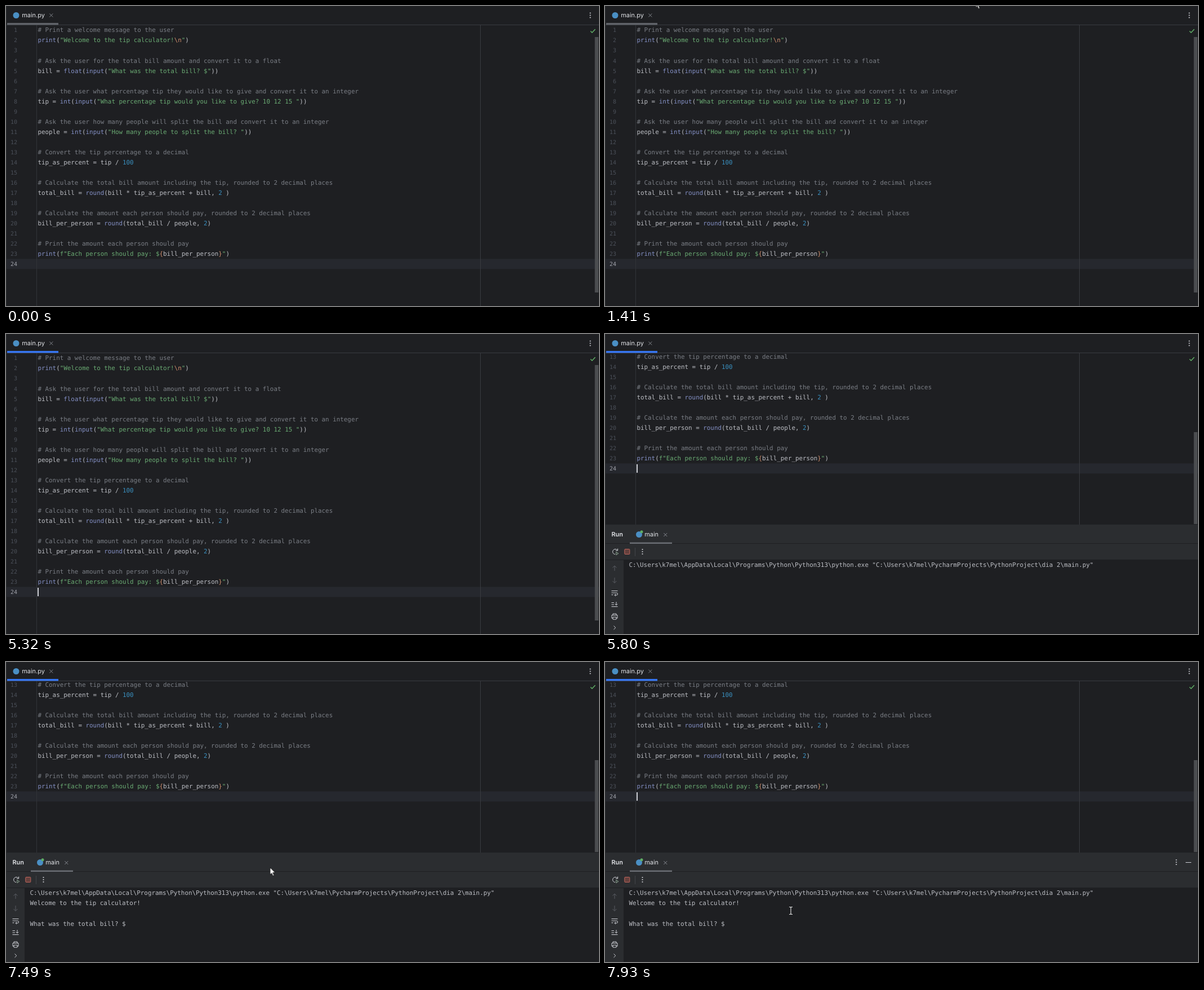
These frames come from a looping animation (1053 by 532 pixels, 8 s). An HTML page:

```html
<!DOCTYPE html>
<html lang="en">
<head>
<meta charset="utf-8">
<title>Tip calculator</title>
<style>
  html, body { margin: 0; width: 100%; height: 100%; overflow: hidden; background: #1e1f22; }
  svg { display: block; width: 100vw; height: 100vh; }
  text { white-space: pre; text-rendering: geometricPrecision; }
  .mono text { font: 10.88px "DejaVu Sans Mono", monospace; fill: #bcbec4; }
  .mono .num { font-size: 10.05px; fill: #4b5059; text-anchor: end; }
  .mono .now { fill: #a1a3ab; }
  .ui { font: 10.92px Inter, sans-serif; fill: #dfe1e5; }
  .title { font-weight: 600; }
  .hint { fill: #868a91; }
  .comment { fill: #7a7e85; }
  .string { fill: #6aab73; }
  .builtin { fill: #8490c5; }
  .number { fill: #3a90c0; }
  .escape { fill: #cf8e6d; }
  .plain { fill: #bcbec4; }
  .icon { fill: none; stroke: #ced0d6; stroke-width: 1; }
  .dim { stroke: #5a5d63; }
  .close { stroke: #868a91; }
  .play { stroke: #8fa894; }
  .dots { fill: #ced0d6; }
  .thumb { fill: #4b4d50; }
</style>
</head>
<body>
<svg viewBox="0 0 1053 532">
  <defs>
    <clipPath id="pane"><rect y="34" width="1053" height="498"/></clipPath>
    <g id="dots" class="dots">
      <circle cy="-4" r="1.1"/><circle r="1.1"/><circle cy="4" r="1.1"/>
    </g>
    <path id="close" class="icon close" d="M-3 -3L3 3M3 -3L-3 3"/>
  </defs>
  <rect width="1053" height="532" fill="#1e1f22"/>

  <!-- editor -->
  <g clip-path="url(#pane)">
    <g id="code" class="mono">
      <rect x="1" y="448.4" width="1052" height="18" fill="#26282e"/>
    </g>
    <path d="M54.5 34V532" stroke="#313438"/>
    <path d="M842.5 34V532" stroke="#393b40"/>
    <g id="caret"><rect x="56" y="450" width="2" height="15" fill="#ced0d6"/></g>
  </g>
  <rect id="thumbTall" class="thumb" x="1045.6" y="55" width="6.4" height="453"/>
  <rect id="thumbShort" class="thumb" x="1045.6" y="174" width="6.4" height="163"/>
  <path d="M1038 44.5L1040.7 47.2L1046.3 41.2" fill="none" stroke="#5fad65" stroke-width="1.6"/>

  <!-- tab bar -->
  <path d="M0 33.5H1053" stroke="#393b40"/>
  <circle cx="18" cy="16.5" r="5.5" fill="#4a8fc4"/>
  <text class="ui" x="28.3" y="20.3">main.py</text>
  <use href="#close" x="80.3" y="16.5"/>
  <use href="#dots" x="1037.5" y="16.5"/>
  <rect x="2" y="30" width="91" height="3.5" fill="#5f6268"/>
  <rect id="focus" x="2" y="30" width="91" height="3.5" fill="#3574f0"/>

  <g id="tip">
    <rect x="666.5" y="-12.5" width="141" height="28" rx="3" fill="#393b40" stroke="#43454a"/>
    <text class="ui" x="675" y="6">Run 'main.py'</text>
    <text class="ui hint" x="749" y="6">Shift+F10</text>
  </g>

  <!-- run panel -->
  <g id="run">
    <rect y="338" width="1053" height="194" fill="#2b2d30"/>
    <rect x="33" y="401" width="1020" height="131" fill="#1e1f22"/>
    <path d="M0 371.5H1053M0 400.5H1053" stroke="#1e1f22"/>
    <text class="ui title" x="11.5" y="359">Run</text>
    <circle cx="60.5" cy="355.5" r="5.5" fill="#4a8fc4"/>
    <circle cx="65" cy="350.8" r="2.5" fill="#5fad65"/>
    <text class="ui" x="70.3" y="359">main</text>
    <use href="#close" x="107.3" y="356"/>
    <rect x="44" y="369.5" width="75" height="2.5" fill="#6a6d73"/>

    <path class="icon" d="M22 383.5A4.6 4.6 0 1 0 18 390.7M22.6 380.5V384H19"/>
    <path class="icon play" d="M19.8 386.6L23.8 389.2L19.8 391.8Z"/>
    <rect x="34.8" y="381.5" width="9" height="9" rx="1" fill="#64403d" stroke="#c0655c"/>
    <path d="M53.5 379V394" stroke="#43454a"/>
    <use href="#dots" x="66.5" y="386"/>

    <path class="icon dim" d="M17 420V411M13.5 414.5L17 411L20.5 414.5"/>
    <path class="icon dim" d="M17 432V441.5M13.5 438L17 441.5L20.5 438"/>
    <path class="icon" d="M11.5 455.5H22.5M11.5 459H20.5A2 2 0 0 1 20.5 463H17M19 461L17 463L19 465M11.5 462.5H14.5"/>
    <path class="icon" d="M11.5 476.5H16M11.5 480H16M11.5 483.5H22.5M20 475V481M17.7 478.8L20 481L22.3 478.8"/>
    <path class="icon" d="M14 498.5V496H20V498.5M14 504H12V498.5H22V504H20M14 502H20V506H14Z"/>
    <path class="icon" d="M15.5 517.5L18.8 520.8L15.5 524"/>

    <g class="mono">
      <text x="42.4" y="413.4">C:\Users\k7mel\AppData\Local\Programs\Python\Python313\python.exe "C:\Users\k7mel\PycharmProjects\PythonProject\dia 2\main.py"</text>
      <g id="output">
        <text x="42.4" y="431.4">Welcome to the tip calculator!</text>
        <text x="42.4" y="467.5">What was the total bill? $</text>
      </g>
    </g>
    <g id="tools">
      <use href="#dots" x="1014.5" y="355"/>
      <path class="icon" d="M1031 355.5H1041"/>
    </g>
  </g>
  <path d="M.5 0V532" stroke="#2b2d30"/>

  <g id="beam" fill="none">
    <path d="M-3 -6.5H-1L0 -5.5L1 -6.5H3M0 -5.5V5.5M-3 6.5H-1L0 5.5L1 6.5H3" stroke="#e8e8e8" stroke-width="1.1"/>
  </g>
  <g id="arrow">
    <path d="M.5 .5V13L3.3 10.4L5.4 15.3L7.5 14.4L5.4 9.6H9.3Z" fill="#fff" stroke="#111" stroke-width=".8"/>
  </g>
</svg>
<script>
const LOOP = 8000, PITCH = 18.04, SCROLL = 219;
const $ = id => document.getElementById(id);

const source = String.raw`# Print a welcome message to the user
print("Welcome to the tip calculator!\n")

# Ask the user for the total bill amount and convert it to a float
bill = float(input("What was the total bill? $"))

# Ask the user what percentage tip they would like to give and convert it to an integer
tip = int(input("What percentage tip would you like to give? 10 12 15 "))

# Ask the user how many people will split the bill and convert it to an integer
people = int(input("How many people to split the bill? "))

# Convert the tip percentage to a decimal
tip_as_percent = tip / 100

# Calculate the total bill amount including the tip, rounded to 2 decimal places
total_bill = round(bill * tip_as_percent + bill, 2 )

# Calculate the amount each person should pay, rounded to 2 decimal places
bill_per_person = round(total_bill / people, 2)

# Print the amount each person should pay
print(f"Each person should pay: $` + String.raw`{bill_per_person}")
`;

// Syntax colouring
function add(parent, tag, cls, str, attrs = {}) {
  const el = document.createElementNS('http://www.w3.org/2000/svg', tag);
  if (cls) el.setAttribute('class', cls);
  for (const k in attrs) el.setAttribute(k, attrs[k]);
  el.textContent = str;
  parent.append(el);
  return el;
}
const tokens = /(^#.*|f?"[^"]*"|\b(?:print|float|input|int|round)\b|\b\d+\b)/;
function kind(s) {
  if (s[0] === '#') return 'comment';
  if (s.includes('"')) return 'string';
  if (/^\d/.test(s)) return 'number';
  return tokens.test(s) ? 'builtin' : 'plain';
}
function inString(s) {
  if (/^(\\n|[{}])$/.test(s)) return 'escape';
  return s === 'bill_per_person' ? 'plain' : 'string';
}
source.split('\n').forEach((line, i, all) => {
  const y = 46.4 + i * PITCH;
  add($('code'), 'text', i === all.length - 1 ? 'num now' : 'num', i + 1, { x: 20, y });
  const row = add($('code'), 'text', '', '', { x: 56.4, y });
  for (const part of line.split(tokens).filter(Boolean)) {
    const cls = kind(part);
    if (cls !== 'string') add(row, 'tspan', cls, part);
    else for (const bit of part.split(/(\\n|[{}]|bill_per_person)/).filter(Boolean))
      add(row, 'tspan', inString(bit), bit);
  }
});

// Hard steps: rows of [time, properties]
function steps(el, rows) {
  const frames = rows.map(([t, props]) => ({ ...props, offset: t / LOOP, easing: 'step-end' }));
  frames.push({ ...rows.at(-1)[1], offset: 1 });
  el.animate(frames, { duration: LOOP, iterations: Infinity });
}
// Starts hidden unless on is true, then flips at each time
function toggle(id, times, on = false) {
  steps($(id), [0, ...times].map((t, i) => [t, { opacity: +(i % 2 ? !on : on) }]));
}
const shift = id => steps($(id), [0, -SCROLL].map((y, i) =>
  [i * 5800, { transform: `translate(0px, ${y}px)` }]));

shift('code');
shift('caret');
toggle('caret', [5320, 6140, 6630, 7180, 7690]);
toggle('focus', [5320]);
toggle('tip', [2370, 5320]);
toggle('run', [5800]);
toggle('thumbTall', [5800], true);
toggle('thumbShort', [5800]);
toggle('output', [6570]);
toggle('tools', [7560]);

// Pointer: [time, x, y]
const path = [
  [670, 1018, 476], [760, 930, 290], [850, 810, 120], [940, 746, 47],
  [1040, 708, 24], [1200, 668, 6], [1440, 655, -15],
  [7060, 663, 2], [7180, 560, 331], [7490, 468.5, 364], [7700, 385, 408], [7930, 330, 441]
];
function at(t) {
  const i = Math.max(1, path.findIndex(p => p[0] >= t));
  const [a, b] = [path[i - 1], path[i]];
  const k = (t - a[0]) / (b[0] - a[0]);
  return [1, 2].map(j => a[j] + (b[j] - a[j]) * k);
}
const ticks = (from, to, n) => Array.from({ length: n + 1 }, (_, i) => from + (to - from) * i / n);
const overText = y => (y >= 34 && y < 338) || y >= 401;

const times = [
  ...ticks(670, 940, 6), ...ticks(980, 1440, 9),
  ...ticks(7060, 7180, 3), 7490, ...ticks(7560, 7930, 9)
];
for (const id of ['beam', 'arrow']) {
  const rows = times.map(t => {
    const [x, y] = at(t);
    const shown = overText(y) === (id === 'beam');
    return [t, { transform: `translate(${x}px, ${y}px)`, opacity: +shown }];
  });
  const hidden = { transform: 'translate(0px, 0px)', opacity: 0 };
  rows.push([0, hidden], [1500, hidden]);
  steps($(id), rows.sort((a, b) => a[0] - b[0]));
}
</script>
</body>
</html>
```
